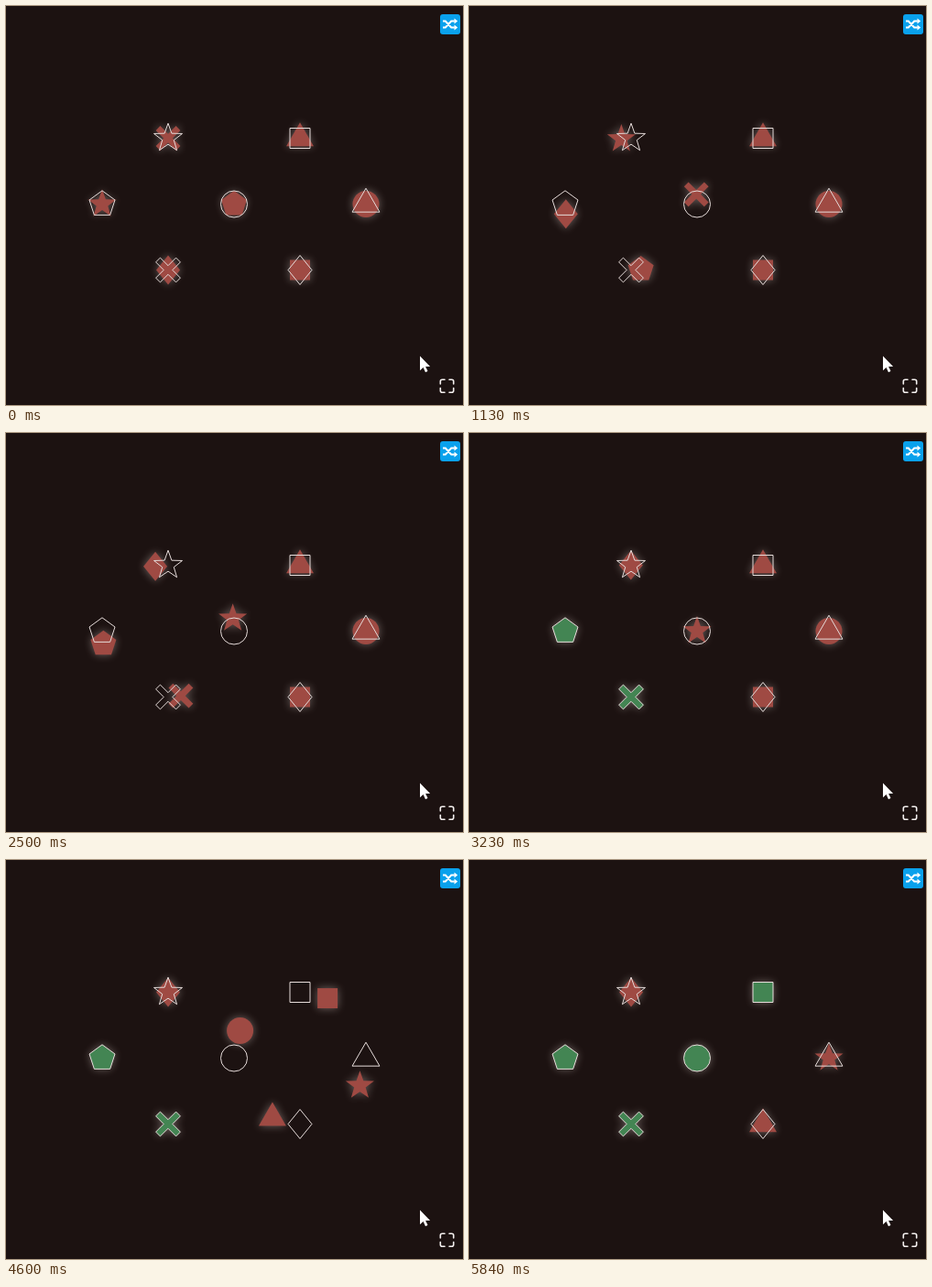
Animation of 499 by 436 pixels, one loop 5.91 s. Source, as an HTML page:

```html
<!DOCTYPE html>
<html lang="en">
<head>
<meta charset="utf-8">
<title>Shape rings</title>
<style>
  html, body { margin: 0; width: 100%; height: 100%; overflow: hidden; background: #1c1211; }
  svg { display: block; }
  .piece { fill: #9f4a43; filter: drop-shadow(0 0 5px rgba(255, 240, 235, .36)); }
  .piece.home { fill: #438553; }
  .slot { fill: none; stroke: #e6dcda; stroke-width: 1; }
</style>
</head>
<body>
<svg width="499" height="436" viewBox="0 0 499 436">
  <g id="pieces"></g>
  <g id="slots"></g>

  <rect x="474" y="9" width="22" height="22" rx="3" fill="#0aa1ec"/>
  <g fill="none" stroke="#fff" stroke-width="2">
    <path d="M477 16.5h2.8l6.4 7h3.6M477 23.5h2.8l6.4-7h3.6"/>
    <path d="M489.5 13.6l3.7 2.9-3.7 2.9zM489.5 20.6l3.7 2.9-3.7 2.9z" fill="#fff" stroke="none"/>
  </g>

  <path d="M474.3 413v-2.7q0-2 2-2h2.7M484 408.3h2.7q2 0 2 2v2.7M488.7 417.5v2.7q0 2-2 2H484M479 422.2h-2.7q-2 0-2-2v-2.7"
        fill="none" stroke="#f4f0ef" stroke-width="1.6" stroke-linecap="round"/>
  <path d="M452 382.5v15.8l3.6-3.3 2.4 5.2 2.5-1.1-2.4-5.1h5z" fill="#fff"/>
</svg>

<script>
const LOOP = 5910, TAU = 170, RADIUS = 72;
const LEFT = { x: 177, y: 216.5, turns: [730, 2146], dir: 1 };
const RIGHT = { x: 321, y: 216.5, turns: [3533, 4380], dir: -1 };
const HANDOVER = RIGHT.turns[0];
const SETTLE = 1460;

// Points on a ring of n corners, first one at the top
const ring = (n, radius) => Array.from({ length: n }, (_, i) => {
  const a = i * 2 * Math.PI / n, r = radius(i);
  return [(r * Math.sin(a)).toFixed(2), (-r * Math.cos(a)).toFixed(2)];
});
const poly = points => 'M' + points.join('L') + 'Z';

const paths = {
  star: poly(ring(10, i => i % 2 ? 6.6 : 16.3)),
  square: 'M-11-11H11V11H-11Z',
  pentagon: poly(ring(5, () => 14.7)),
  circle: 'M-14.5 0a14.5 14.5 0 1 1 29 0a14.5 14.5 0 1 1-29 0Z',
  triangle: poly(ring(3, () => 17.3)),
  cross: 'M0-4.8L8.6-13.4 13.4-8.6 4.8 0 13.4 8.6 8.6 13.4 0 4.8-8.6 13.4-13.4 8.6-4.8 0-13.4-8.6-8.6-13.4Z',
  diamond: 'M0-16L13 0 0 16-13 0Z'
};

const homes = {
  star: [177, 144.5], square: [321, 144.5], pentagon: [105, 216.5], circle: [249, 216.5],
  triangle: [393, 216.5], cross: [177, 288.5], diamond: [321, 288.5]
};

// Start angles in degrees, clockwise from the right
const pieces = [
  { name: 'cross', ring: LEFT, angle: -90 },
  { name: 'pentagon', ring: LEFT, angle: 0 },
  { name: 'diamond', ring: LEFT, angle: 90 },
  { name: 'triangle', ring: RIGHT, angle: -90 },
  { name: 'circle', ring: RIGHT, angle: 0 },
  { name: 'square', ring: RIGHT, angle: 90 },
  { name: 'star', ring: LEFT, nextRing: RIGHT, angle: 180 }
];

const move = (el, x, y) =>
  el.setAttribute('transform', `translate(${x.toFixed(3)} ${y.toFixed(3)})`);

function addShape(parent, name, className) {
  const el = document.createElementNS('http://www.w3.org/2000/svg', 'path');
  el.setAttribute('d', paths[name]);
  el.setAttribute('class', className);
  document.getElementById(parent).append(el);
  return el;
}

for (const name in homes) move(addShape('slots', name, 'slot'), ...homes[name]);
for (const p of pieces) p.el = addShape('pieces', p.name, 'piece');

// Each quarter turn closes in on its goal exponentially, then snaps
const quarter = dt => dt <= 0 ? 0 : dt >= SETTLE ? 1 : 1 - Math.exp(-dt / TAU);
const turned = (r, t) =>
  r.dir * 90 * r.turns.reduce((sum, start) => sum + quarter(t - start), 0);

function draw(t) {
  for (const p of pieces) {
    const r = p.nextRing && t >= HANDOVER ? p.nextRing : p.ring;
    const a = (p.angle + turned(r, t)) * Math.PI / 180;
    const x = r.x + RADIUS * Math.cos(a), y = r.y + RADIUS * Math.sin(a);
    const [hx, hy] = homes[p.name];
    move(p.el, x, y);
    p.el.classList.toggle('home', Math.hypot(x - hx, y - hy) < 2);
  }
}

const begin = performance.now();
function tick() {
  draw((performance.now() - begin) % LOOP);
  requestAnimationFrame(tick);
}
tick();
</script>
</body>
</html>
```
